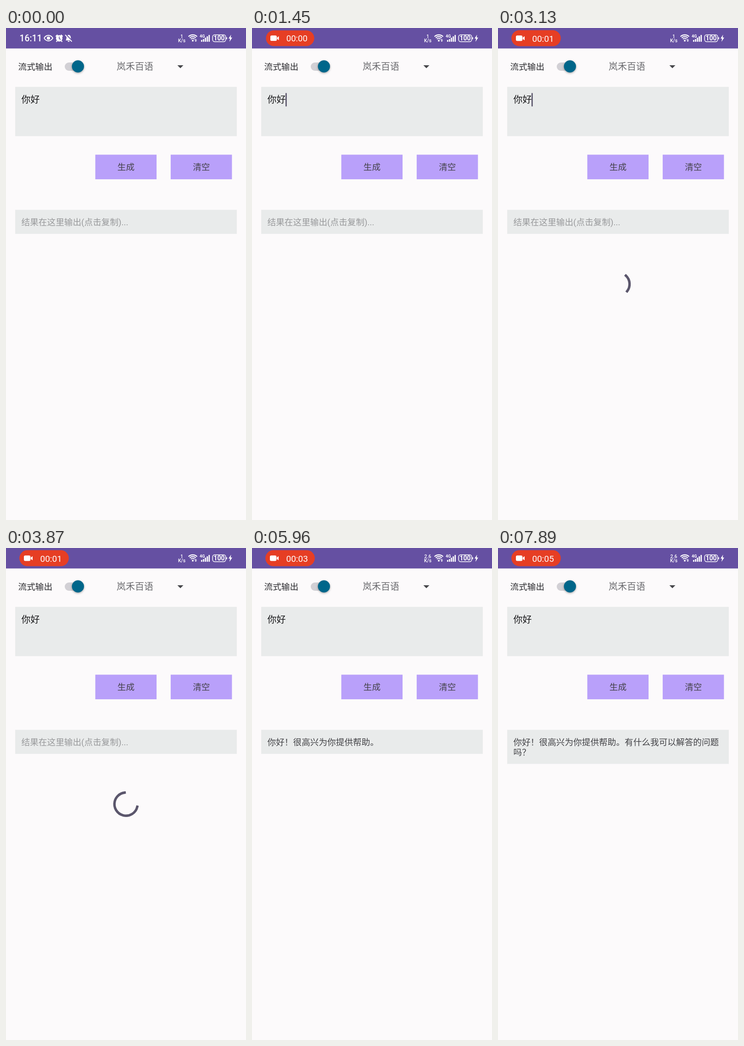
An HTML page with a canvas that plays this animation: 523x1070 px, repeating every 7990 ms.

```html
<!DOCTYPE html>
<html lang="zh-CN">
<head>
<meta charset="utf-8">
<title>流式输出</title>
<style>
html, body { margin: 0; width: 100%; height: 100%; overflow: hidden; background: #fcfafb; }
canvas { display: block; width: 523px; height: 1070px; }
</style>
</head>
<body>
<canvas id="stage"></canvas>
<script>
const W = 523, H = 1070, LOOP = 7990;
const canvas = document.getElementById('stage');
const ctx = canvas.getContext('2d');
const dpr = window.devicePixelRatio || 1;
canvas.width = W * dpr;
canvas.height = H * dpr;

const FONT = 'Roboto, "Noto Sans CJK SC", "Noto Sans CJK", sans-serif';
const PAGE = '#fcfafb', BAR = '#6550a2', WHITE = '#fff', FIELD = '#e9ebeb', ACCENT = '#5b566c';
const HINT = '结果在这里输出(点击复制)...';
const REPLY = '你好！很高兴为你提供帮助。有什么我可以解答的问题吗？';
const LINE_CHARS = 24;

// [time, value] steps; the last one reached holds
const seconds = [[0, 0], [2900, 1], [4150, 2], [5400, 3], [6700, 4], [7890, 5]];
const typed = [[0, 0], [5080, 2], [5260, 3], [5440, 6], [5640, 13], [6120, 18], [6480, 24], [6800, 26]];
const caret = [[0, 0], [650, 1], [1830, 0], [2260, 1], [3800, 0], [4950, 1], [5640, 0], [6300, 1], [6950, 0], [7490, 1], [7890, 0]];
const SPIN = { from: 2604, to: 5080, cycle: 3756 };

const clamp = v => Math.min(1, Math.max(0, v));
const span = (t, a, b) => clamp((t - a) / (b - a));
const rad = deg => deg * Math.PI / 180;

function stepAt(list, t) {
  let value = list[0][1];
  for (const [at, v] of list) if (t >= at) value = v;
  return value;
}

// cubic-bezier(.4, 0, .2, 1)
function ease(x) {
  let lo = 0, hi = 1;
  for (let i = 0; i < 24; i++) {
    const m = (lo + hi) / 2, n = 1 - m;
    if (1.2 * m * n * n + 0.6 * m * m * n + m * m * m < x) lo = m; else hi = m;
  }
  return lo * lo * (3 - 2 * lo);
}

function rect(x, y, w, h, color, r = 0) {
  ctx.fillStyle = color;
  ctx.beginPath();
  ctx.roundRect(x, y, w, h, r);
  ctx.fill();
}

function text(str, x, cy, size, color, weight = 400, align = 'left') {
  ctx.font = `${weight} ${size}px ${FONT}`;
  ctx.textAlign = align;
  ctx.fillStyle = color;
  ctx.fillText(str, x, cy + size * 0.37);
}

function poly(points, color) {
  ctx.fillStyle = color;
  ctx.beginPath();
  points.forEach(([x, y]) => ctx.lineTo(x, y));
  ctx.closePath();
  ctx.fill();
}

function line(points, color, width) {
  ctx.strokeStyle = color;
  ctx.lineWidth = width;
  ctx.beginPath();
  points.forEach(([x, y]) => ctx.lineTo(x, y));
  ctx.stroke();
}

function arc(x, y, r, a, b, color, width) {
  ctx.strokeStyle = color;
  ctx.lineWidth = width;
  ctx.beginPath();
  ctx.arc(x, y, r, rad(a), rad(b));
  ctx.stroke();
}

function dot(x, y, r, color) {
  ctx.fillStyle = color;
  ctx.beginPath();
  ctx.arc(x, y, r, 0, Math.PI * 2);
  ctx.fill();
}

function drawEye() {
  ctx.strokeStyle = WHITE;
  ctx.lineWidth = 2;
  ctx.beginPath();
  ctx.moveTo(83, 22);
  ctx.bezierCurveTo(88, 14, 97, 14, 102, 22);
  ctx.bezierCurveTo(97, 30, 88, 30, 83, 22);
  ctx.stroke();
  dot(92.5, 22, 3.6, WHITE);
}

function drawAlarm() {
  dot(116, 22.5, 7, WHITE);
  line([[108.5, 18.5], [112.5, 15]], WHITE, 2.4);
  line([[119.5, 15], [123.5, 18.5]], WHITE, 2.4);
  line([[111.5, 28], [109.5, 30]], WHITE, 2.2);
  line([[120.5, 28], [122.5, 30]], WHITE, 2.2);
  line([[116, 18.5], [116, 23], [119, 25]], BAR, 1.6);
}

function drawMutedBell() {
  ctx.fillStyle = WHITE;
  ctx.beginPath();
  ctx.moveTo(130, 27);
  ctx.quadraticCurveTo(131.8, 25, 131.8, 21);
  ctx.bezierCurveTo(131.8, 13, 141.2, 13, 141.2, 21);
  ctx.quadraticCurveTo(141.2, 25, 143, 27);
  ctx.fill();
  rect(134.5, 28, 4, 2, WHITE, 1);
  line([[130, 14], [144.5, 28.5]], BAR, 3);
  line([[129, 15], [143.5, 29.5]], WHITE, 1.8);
}

function drawSignals(t) {
  text(t < 4960 ? '1' : '2.6', 383, 18, 10.5, WHITE, 500, 'center');
  text('K/s', 383, 27.5, 10.5, WHITE, 500, 'center');

  for (const r of [5.5, 9.3, 13.2]) arc(407, 28, r, -135, -45, WHITE, 2.2);
  dot(407, 27.5, 2, WHITE);
  poly([[411, 26.5], [413.5, 23.8], [416, 26.5]], WHITE);
  poly([[411, 27.5], [413.5, 30], [416, 27.5]], WHITE);

  text('4G', 422, 18, 9, WHITE, 700);
  [4, 6, 9, 12, 15].forEach((h, i) => rect(425 + i * 4.1, 30 - h, 2.7, h, WHITE, 0.8));

  ctx.strokeStyle = WHITE;
  ctx.lineWidth = 1.5;
  ctx.beginPath();
  ctx.roundRect(450.2, 14.7, 28.6, 15, 4.5);
  ctx.stroke();
  text('100', 464.5, 22.3, 14, WHITE, 600, 'center');
  rect(480, 20, 1.8, 4.5, WHITE, 0.8);
  poly([[490.5, 14.5], [485, 23], [488.3, 23], [487, 30], [493, 20.8], [489.5, 20.8]], WHITE);
}

function drawPill(t) {
  if (t < 350) return;
  const d = t - 890;
  const scale = d < 0
    ? 0.4 + 0.49 * (1 - (1 - span(t, 350, 890)) ** 2)
    : 1 - 0.11 * Math.exp(-d / 350) * Math.cos(d / 560 * 2 * Math.PI);
  ctx.save();
  ctx.globalAlpha = span(t, 350, 600);
  ctx.translate(83, 22.2);
  ctx.scale(scale, scale);
  rect(-53.8, -17.4, 107.6, 34.8, '#e63e24', 17.4);
  rect(-44, -6, 14.3, 12, WHITE, 3);
  poly([[-29, -1.5], [-25, -4.5], [-25, 4.5], [-29, 1.5]], WHITE);
  text('00:0' + stepAt(seconds, t), -8.5, 0.3, 19, WHITE);
  ctx.restore();
}

function drawStatusBar(t) {
  rect(0, 0, W, 44.5, BAR);
  ctx.save();
  ctx.globalAlpha = 1 - span(t, 90, 350);
  if (ctx.globalAlpha > 0) {
    text('16:11', 29.5, 22.3, 19.3, WHITE, 500);
    drawEye();
    drawAlarm();
    drawMutedBell();
  }
  ctx.restore();
  drawPill(t);
  drawSignals(t);
}

function drawControls() {
  text('流式输出', 26.5, 84, 18.67, '#2c2c30');
  rect(128, 75, 38, 18, '#d2d0d5', 9);
  ctx.save();
  ctx.shadowColor = 'rgba(0,0,0,.35)';
  ctx.shadowBlur = 4 * dpr;
  ctx.shadowOffsetY = 1.5 * dpr;
  dot(156.8, 83.5, 13.2, '#00668a');
  ctx.restore();
  text('岚禾百语', 241, 84, 20, '#6a6a6e');
  poly([[373.5, 81], [386.5, 81], [380, 87.5]], '#46464a');
}

function drawForm(t) {
  rect(20, 128, 483, 107.3, FIELD);
  text('你好', 33.5, 156, 20, '#151517');
  if (stepAt(caret, t)) rect(73, 141.5, 2.7, 29, ACCENT);
  [[194.6, '生成'], [358.9, '清空']].forEach(([x, label]) => {
    rect(x, 275.6, 133.5, 53.4, '#b9a0fa');
    text(label, x + 66.9, 302.5, 18.67, '#444249', 400, 'center');
  });
}

function drawResult(t) {
  const shown = REPLY.slice(0, stepAt(typed, t));
  const wraps = shown.length > LINE_CHARS;
  rect(20, 395.5, 483, wraps ? 74 : 52.3, FIELD);
  if (!shown) return text(HINT, 33.5, 422.5, 18.67, '#98999b');
  text(shown.slice(0, LINE_CHARS), 33.5, 422.5, 18.67, '#434347');
  if (wraps) text(shown.slice(LINE_CHARS), 33.5, 444.5, 18.67, '#434347');
}

function drawSpinner(t) {
  if (t < SPIN.from || t >= SPIN.to) return;
  const u = (t - SPIN.from) / SPIN.cycle;
  const turn = -90 + (90 + 216) * u;
  const tail = turn + 270 * ease(clamp(2 * u - 1));
  const head = turn + 270 * ease(clamp(2 * u));
  ctx.lineCap = 'square';
  arc(261.5, 557, 25.2, tail, Math.max(head, tail + 0.5), ACCENT, 5.4);
  ctx.lineCap = 'butt';
}

function draw(t) {
  ctx.setTransform(dpr, 0, 0, dpr, 0, 0);
  rect(0, 0, W, H, PAGE);
  drawStatusBar(t);
  drawControls();
  drawForm(t);
  drawResult(t);
  drawSpinner(t);
}

const start = performance.now();
function tick() {
  draw((performance.now() - start) % LOOP);
  requestAnimationFrame(tick);
}
tick();
</script>
</body>
</html>
```
